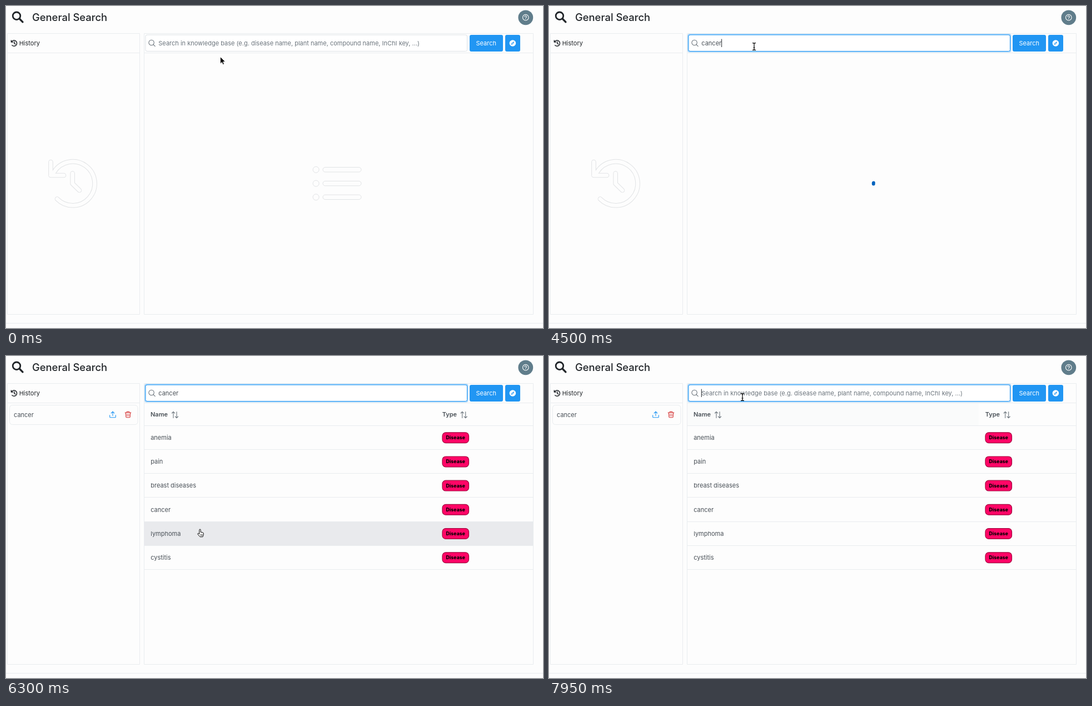
An HTML page for the animation above (8000 ms loop, 966 by 580 pixels).

```html
<!DOCTYPE html>
<html lang="en">
<head>
<meta charset="utf-8">
<title>General Search</title>
<style>
  html, body { margin: 0; width: 100%; height: 100%; overflow: hidden; background: #fdfdfd; }
  svg { display: block; }
  text { font: 11px Inter, sans-serif; fill: #495057; white-space: pre; }
  .dark { fill: #212529; }
  .title { font-size: 18.4px; font-weight: 500; }
  .head { font-weight: 600; }
  .hint { fill: #6c757d; }
  .tag { font-size: 8.5px; font-weight: 800; letter-spacing: .12px; fill: #000; text-anchor: middle; }
  .line { fill: none; stroke: #e9ecef; }
  .icon { fill: none; stroke-linecap: round; stroke-linejoin: round; }
  .ghost { fill: none; stroke: #e1e3e5; }
</style>
</head>
<body>
<svg width="966" height="580" viewBox="0 0 966 580">
  <!-- page header -->
  <g class="icon" stroke="#212529" stroke-width="2.8">
    <circle cx="19" cy="17.8" r="6.8"/><path d="M24.3 23L30 28.8" stroke-width="3.3"/>
  </g>
  <text class="dark title" x="47" y="26.6">General Search</text>
  <circle cx="934.8" cy="20.8" r="13.4" fill="#607d8b"/>
  <g class="icon" stroke="#fff" stroke-width="1.1">
    <circle cx="934.8" cy="20.7" r="5.3"/>
    <path d="M933.1 19.5a1.7 1.7 0 1 1 2.5 1.5q-.8.4-.8 1.1M934.8 23.7v.1"/>
  </g>

  <!-- panels -->
  <path class="line" d="M2.5 49.5h238v506H2.5zM2.5 84.5h238M248.5 49.5h700v506h-700zM248.5 84.5h700M0 571.5h966"/>
  <g class="icon" stroke="#212529" stroke-width="1.5">
    <path d="M10.9 70.8A5.1 5.1 0 1 0 10.3 64.2M9.4 62v2.9h2.9M14.8 64.3v2.9l1.9 1.5"/>
  </g>
  <text class="dark" x="23.7" y="71">History</text>

  <!-- empty history -->
  <g id="noHistory">
    <g class="icon" stroke="#e1e3e5" stroke-width="8.6"><use href="#clock"/></g>
    <g class="icon" stroke="#fdfdfd" stroke-width="6.6">
      <path id="clock" d="M92 347.5A39.5 39.5 0 1 0 86.5 299L80.5 305H104M80.5 281V305M119.7 301.5V320L132 332"/>
    </g>
  </g>

  <!-- search bar -->
  <rect id="glow" x="249" y="50" width="582.5" height="33.5" rx="4" fill="#a6d5fa"/>
  <rect id="field" x="251" y="52" width="578.5" height="29.5" rx="3" fill="#fff"/>
  <g class="icon" stroke="#6c757d" stroke-width="1.1">
    <circle cx="261.6" cy="66" r="4.7"/><path d="M265 69.4l3.2 3.2"/>
  </g>
  <rect id="selection" x="274" y="59" width="36.5" height="15" fill="#b3d7ff"/>
  <text id="query" x="274.3" y="71"></text>
  <rect id="caret" y="59.5" width="1" height="14.5" fill="#212529"/>
  <rect x="834" y="52" width="60" height="30" rx="3" fill="#2196f3"/>
  <text x="863.7" y="71" text-anchor="middle" style="fill:#fff">Search</text>
  <rect x="898" y="52" width="27" height="30" rx="3" fill="#2196f3"/>
  <circle cx="911.4" cy="67" r="5.8" fill="#fff"/>
  <path d="M914.4 64l-1.8 4.2-4.2 1.8 1.8-4.2z" fill="#2196f3"/>
  <circle cx="911.4" cy="67" r=".9" fill="#fff"/>

  <!-- empty list, spinner, results -->
  <g id="noList" class="ghost"></g>
  <circle id="spinner" class="icon" cx="598.4" cy="320" r="20"/>
  <g id="results">
    <rect id="hover"/>
    <g id="table"></g>
    <rect class="line" x="6.5" y="88.5" width="230.5" height="35" rx="5"/>
    <text x="14" y="109.8">cancer</text>
    <g class="icon" stroke="#2196f3" stroke-width="1.1">
      <path d="M186.7 106.5v3.2q0 1 1 1h8.6q1 0 1-1v-3.2M192 107.5v-7M189.2 103l2.8-2.8 2.8 2.8"/>
    </g>
    <g class="icon" stroke="#d32f2f" stroke-width="1.1">
      <path d="M214.2 102h10.6M215.3 102l.5 7.8q.1 1 1 1h5.4q.9 0 1-1l.5-7.8M217.4 102v-1.8h4.2v1.8M218 104.6v3.6M221 104.6v3.6"/>
    </g>
  </g>

  <!-- pointers -->
  <path id="arrow" d="M0 0V12.4L2.9 9.8 4.8 14 6.9 13 5.1 9H9Z" fill="#000" stroke="#fff" stroke-width=".8"/>
  <g id="beam" fill="none">
    <path d="M-3-6.3Q0-6.5 0-5V5Q0 6.5-3 6.3M3-6.3Q0-6.5 0-5V5Q0 6.5 3 6.3M-1.5 2h3" stroke="#000" stroke-width="1.2"/>
  </g>
  <g id="hand" fill="#fff" stroke="#000" stroke-linejoin="round">
    <path d="M-1.2 1.3a1.2 1.2 0 0 1 2.4 0V5.2l3.6.7q1.6.5 1.5 2.2l-.5 3.2-.9 2.4H0L-3.9 9.2q-.8-1.3.3-1.8.9-.2 2.4 1.4z"/>
    <path d="M1 9.2v2.6M2.6 9.2v2.6M4.2 9.2v2.6" stroke-width=".7"/>
  </g>
</svg>
<script>
const LOOP = 8000, STEP = 150;
const HINT = 'Search in knowledge base (e.g. disease name, plant name, compound name, InChI key, ...)';
const DISEASES = ['anemia', 'pain', 'breast diseases', 'cancer', 'lymphoma', 'cystitis'];
const ROW = 43.2, TOP = 125.3;
const $ = id => document.getElementById(id);
const set = (el, attrs) => { for (const k in attrs) el.setAttribute(k, attrs[k]); };
const show = (id, on) => { $(id).style.display = on ? '' : 'none'; };

const sortIcon = x => `<path class="icon" stroke="#6c757d" stroke-width="1.1"
  d="M${x} 111.5v-11M${x - 2.6} 103l2.6-2.6 2.6 2.6M${x + 6} 100.5v11M${x + 3.4} 109l2.6 2.6 2.6-2.6"/>`;

$('table').innerHTML =
  `<text class="head" x="260" y="109.4">Name</text>${sortIcon(301)}
   <text class="head" x="784.7" y="109.4">Type</text>${sortIcon(820.7)}
   <path class="line" d="M249 125.5h699"/>` +
  DISEASES.map((name, i) => {
    const y = TOP + ROW * i;
    return `<text x="260.2" y="${y + 25.7}">${name}</text>
      <rect x="785" y="${y + 12.5}" width="47.5" height="18.8" rx="6" fill="#ff0566" stroke="#a3063f" stroke-width="1.2"/>
      <text class="tag" x="808.8" y="${y + 24.9}">Disease</text>
      <path class="line" d="M249 ${Math.floor(y + ROW) + .5}h699"/>`;
  }).join('');

$('noList').innerHTML = [294.8, 319.6, 344.3].map(y =>
  `<circle cx="557.6" cy="${y}" r="5.5"/><rect x="570" y="${y - 4.2}" width="69" height="8.4" rx="4.2"/>`).join('');

// pointer path: time, x, y
const PATH = [
  [0, 385.5, 91.5], [150, 385, 88], [300, 383, 76], [450, 382, 70],
  [3150, 382, 70], [3600, 369, 73], [4800, 369, 73], [4950, 372, 90],
  [5100, 375, 106], [5250, 374.5, 126.5], [5400, 370, 165], [5550, 362, 213],
  [5700, 355.5, 219], [5850, 352, 300], [6000, 350, 312], [6300, 349, 312],
  [6450, 349, 300], [6600, 349, 224], [6750, 348, 115], [6900, 348, 97],
  [7050, 348, 82], [7200, 348, 74], [LOOP, 348, 74]
];
function pointerAt(t) {
  const i = Math.max(1, PATH.findIndex(p => p[0] >= t));
  const [a, b] = [PATH[i - 1], PATH[i]];
  const k = (t - a[0]) / (b[0] - a[0]);
  return [a[1] + (b[1] - a[1]) * k, a[2] + (b[2] - a[2]) * k];
}

function queryAt(t) {
  if (t < 1050 || t >= 7950) return '';
  return 'cancer'.slice(0, t < 1200 ? 1 : t < 1350 ? 3 : t < 1500 ? 4 : 6);
}

const ease = x => .5 - .5 * Math.cos(Math.PI * x);
const HUES = [[0, 214, 45, 32], [2.4, 0, 87, 231], [3.96, 0, 135, 68]];

function drawSpinner(t) {
  const s = (t - 1575) / 1000, d = s % 1.5 / .75;
  const p = ease(d % 1);
  const len = d < 1 ? 1 + 88 * p : 89;
  const offset = d < 1 ? 35 * p : 35 + 89 * p;
  const turn = 180 * s + (t < 2100 ? 207 : 20);
  const [a, b] = s < 2.4 ? HUES : HUES.slice(1);
  const k = ease((s - a[0]) / (b[0] - a[0]));
  const rgb = [1, 2, 3].map(i => Math.round(a[i] + (b[i] - a[i]) * k));
  set($('spinner'), {
    transform: `translate(598.4 320) scale(.735) rotate(${turn}) translate(-598.4 -320)`,
    stroke: `rgb(${rgb})`, 'stroke-width': 8,
    'stroke-dasharray': `${len} 200`, 'stroke-dashoffset': -offset
  });
}

function drawHover(t) {
  const y = pointerAt(t - 75)[1];
  const row = Math.floor((y - TOP) / ROW);
  let box = { x: 249, y: 85, width: 524, height: 40, fill: '#e9eaed' };
  if (row >= 0) Object.assign(box, { y: TOP + ROW * row + .7, width: 699, height: ROW - .7 });
  else if (y < 85) box.fill = t >= 7200 ? '#fafbfb' : 'none';
  set($('hover'), box);
}

function render(time) {
  const t = Math.floor(time / STEP) * STEP;
  const focus = t >= 450, busy = t >= 1650 && t < 4650, done = t >= 4650;
  const query = queryAt(t), selected = t === 7800;

  show('glow', focus);
  set($('field'), { stroke: focus ? '#2196f3' : '#dee2e6' });
  $('query').textContent = query || HINT;
  $('query').setAttribute('class', query ? '' : 'hint');
  show('selection', selected);

  const blink = t < 1050 ? t < 900 : t < 1500 || t >= 7950 || (t - 1400) % 1000 < 500;
  show('caret', focus && blink && !selected);
  set($('caret'), { x: query ? 274.2 + $('query').getComputedTextLength() : 273.8 });

  show('noHistory', !done);
  show('noList', t < 1650);
  show('spinner', busy);
  show('results', done);
  if (busy) drawSpinner(t);
  if (done) drawHover(t);

  const [x, y] = pointerAt(t);
  const kind = t < 300 ? 'arrow' : y < 84 ? 'beam' : 'hand';
  for (const id of ['arrow', 'beam', 'hand']) show(id, id === kind);
  set($(kind), { transform: `translate(${x} ${y})` });
}

function tick() {
  render(performance.now() % LOOP);
  requestAnimationFrame(tick);
}
tick();
</script>
</body>
</html>
```
